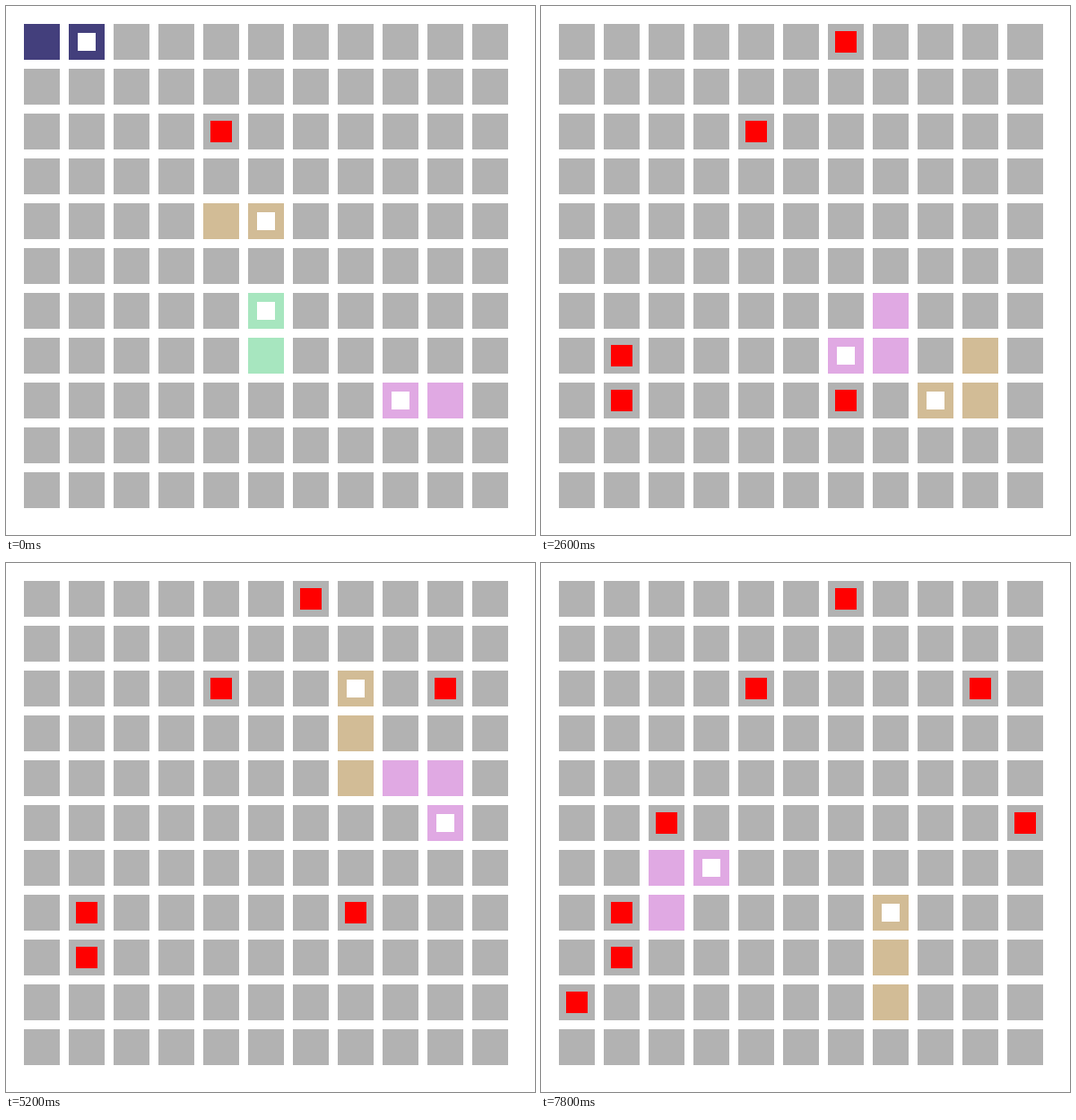
Animation of 590x590 px, one loop 8 s. Source, as an HTML page with a canvas:

```html
<!DOCTYPE html>
<html lang="en">
<head>
<meta charset="utf-8">
<title>Snakes on a grid</title>
<style>
  html, body { margin: 0; width: 100%; height: 100%; overflow: hidden; background: #fff; }
  canvas { display: block; }
</style>
</head>
<body>
<canvas id="stage" width="590" height="590"></canvas>
<script>
const ctx = document.getElementById('stage').getContext('2d');
const STEP_MS = 200, STEPS = 40, GRID = 11, LENGTH = 3;
const MOVES = { R: [1, 0], L: [-1, 0], U: [0, -1], D: [0, 1] };

// Each snake starts with its tail cell; the first move places its head at step 0.
const snakes = [
  { color: '#433f7c', start: [0, 0], moves: 'R RRDDDD' },
  { color: '#d2bc96', start: [4, 4], moves: 'R RRUURRDDD DDDLLLDLU UUURURUU RDDRD DDDDLLUU' },
  { color: '#a7e6bf', start: [5, 7], moves: 'U RULLLLDRD DRR' },
  { color: '#e0a9e3', start: [9, 8], moves: 'L LLLUUUURR DDDLLUUUU URRRDDRD DDDLL LLLLLUUR' },
].map(({ color, start, moves }) => {
  const path = [start];
  for (const move of moves.replaceAll(' ', '')) {
    const [x, y] = path.at(-1), [dx, dy] = MOVES[move];
    path.push([x + dx, y + dy]);
  }
  return { color, path };
});

// Column, row, step of appearance, step when eaten
const food = [
  [4, 2, 0], [1, 8, 3], [6, 0, 6], [6, 8, 7, 15], [1, 7, 11], [9, 2, 21],
  [7, 7, 22, 39], [10, 5, 28], [2, 5, 31], [0, 9, 34],
];

function square(col, row, size, color) {
  const inset = (40 - size) / 2;
  ctx.fillStyle = color;
  ctx.fillRect(20 + col * 50 + inset, 20 + row * 50 + inset, size, size);
}

function draw(step) {
  ctx.fillStyle = '#fff';
  ctx.fillRect(0, 0, 590, 590);
  for (let row = 0; row < GRID; row++)
    for (let col = 0; col < GRID; col++) square(col, row, 40, '#b2b2b2');

  for (const [col, row, from, until = STEPS] of food)
    if (step >= from && step < until) square(col, row, 24, '#f00');

  for (const { color, path } of snakes) {
    const head = step + 1;
    if (head >= path.length) continue;
    for (const [col, row] of path.slice(Math.max(0, head + 1 - LENGTH), head + 1))
      square(col, row, 40, color);
    square(...path[head], 20, '#fff');
  }
}

function frame() {
  draw(Math.floor(performance.now() / STEP_MS) % STEPS);
  requestAnimationFrame(frame);
}
frame();
</script>
</body>
</html>
```
